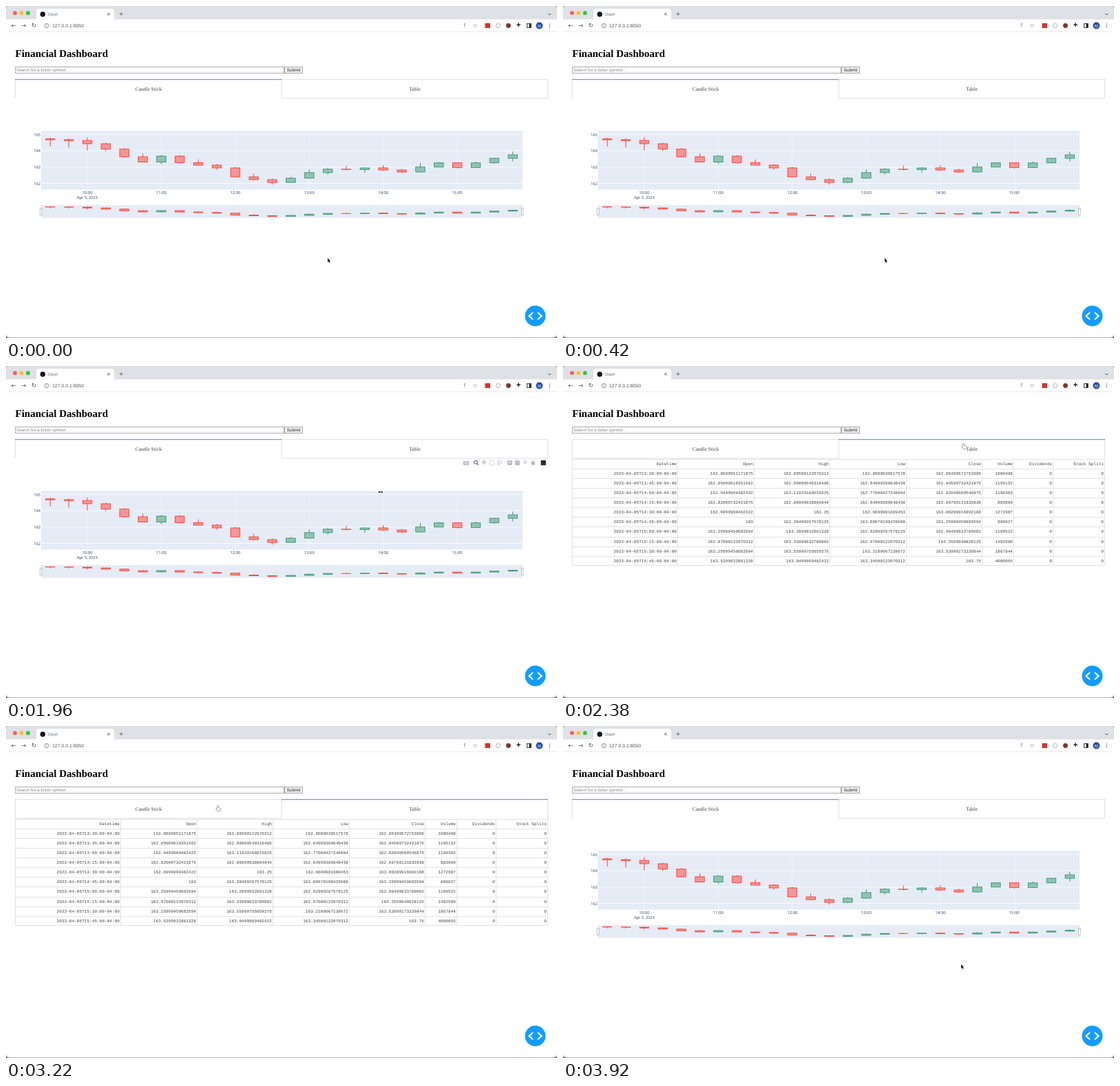
An HTML page with a canvas for the animation above (3.99 s loop, 800x482 px).

```html
<!DOCTYPE html>
<html lang="en">
<head>
<meta charset="utf-8">
<title>Financial Dashboard</title>
<style>
html, body { margin: 0; width: 100%; height: 100%; overflow: hidden; background: #fff; }
canvas { display: block; }
</style>
</head>
<body>
<canvas id="stage" width="800" height="482"></canvas>
<script>
const ctx = document.getElementById('stage').getContext('2d');
ctx.textRendering = 'geometricPrecision';

const LOOP = 3990, STEP = 70, TABLE_FROM = 2310, TABLE_TO = 3360;
const SANS = '"Liberation Sans", Arial, sans-serif';
const SERIF = '"Liberation Serif", Times, serif';
const MONO = '"Liberation Mono", Courier, monospace';
const PLOT = '"Open Sans", Verdana, sans-serif';
const ICON = '"DejaVu Sans", sans-serif';
const UP = '61,153,112', DOWN = '255,65,54', INK = '#2a3f5f';

// Closing prices from 9:30 to 13:15, every 15 minutes
const morning = [164.68, 164.63, 164.43, 164.1, 163.63, 163.31, 163.67, 163.27,
  163.12, 162.95, 162.4, 162.23, 162.06, 162.32, 162.66, 162.87];
// Text of the table from 13:30: high, low, close, volume
const afternoon = `163.095 162.8 162.855 1000498
  162.99 162.65 162.945 1195132
  163.1192 162.77 162.8205 1190303
  162.89 162.65 162.6976 883069
  163.25 162.67 163.0029 1272987
  163.305 163.0007 163.26 886027
  163.29 162.93 162.965 1169522
  163.34 162.97 163.255 1482590
  163.56 163.21 163.5399 1867844
  163.95 163.345 163.75 4000055`.split('\n').map(line => line.trim().split(' ').map(Number));

// Each bar opens at the last close, rounded to cents
const bars = [];
let open = 164.73;
function addBar(high, low, close, volume) {
  bars.push({ open, high, low, close, volume });
  open = Math.round(close * 100) / 100;
}
morning.forEach((close, i) => {
  const above = i % 3 === 2 ? .2 : .07;
  const below = i < 3 ? .42 : i % 3 ? .03 : .13;
  addBar(Math.max(open, close) + above, Math.min(open, close) - below, close);
});
afternoon.forEach(row => addBar(...row));

const columns = { Datetime: 166, Open: 277, High: 387, Low: 498, Close: 608,
  Volume: 654, Dividends: 711, 'Stock Splits': 786 };

// Pointer moves: begin, end, x, y
const home = [467, 366];
const moves = [
  [700, 1120, 451, 371], [1330, 1960, 544, 183], [1960, 2240, 582, 113],
  [2660, 3010, 308, 116], [3290, 3640, 578, 346]
];

function text(s, x, y, size, family, color, align = 'left', weight = '') {
  ctx.font = `${weight} ${size}px ${family}`;
  ctx.fillStyle = color;
  ctx.textAlign = align;
  ctx.fillText(s, x, y);
}
function icon(s, x, y, size, color = '#444') {
  ctx.textBaseline = 'middle';
  text(s, x, y, size, ICON, color, 'center');
  ctx.textBaseline = 'alphabetic';
}
function rect(x, y, w, h, fill) {
  ctx.fillStyle = fill;
  ctx.fillRect(x, y, w, h);
}
function box(x, y, w, h, color, width = 1) {
  ctx.strokeStyle = color;
  ctx.lineWidth = width;
  ctx.strokeRect(x, y, w, h);
}
function disc(x, y, r, fill) {
  ctx.beginPath();
  ctx.arc(x, y, r, 0, 7);
  ctx.fillStyle = fill;
  ctx.fill();
}
function ring(x, y, r, color, width = .8) {
  ctx.beginPath();
  ctx.arc(x, y, r, 0, 7);
  ctx.strokeStyle = color;
  ctx.lineWidth = width;
  ctx.stroke();
}
function round(x, y, w, h, r, fill) {
  ctx.beginPath();
  ctx.roundRect(x, y, w, h, r);
  ctx.fillStyle = fill;
  ctx.fill();
}
function path(d, x, y, stroke, width, fill) {
  const p = new Path2D(d);
  ctx.save();
  ctx.translate(x, y);
  ctx.strokeStyle = stroke;
  ctx.lineWidth = width;
  ctx.stroke(p);
  if (fill) { ctx.fillStyle = fill; ctx.fill(p); }
  ctx.restore();
}

function browser() {
  rect(0, 0, 800, 241, '#d9b45c');
  rect(0, 241, 800, 241, '#77777b');
  round(0, 0, 800, 481.5, 5, '#fff');
  round(0, 0, 800, 19.5, [5, 5, 0, 0], '#dee1e6');
  ['#fe5f57', '#febc2e', '#28c840'].forEach((c, i) => disc(13 + i * 9.5, 10.2, 2.9, c));
  round(44, 4, 113, 16, [4, 4, 0, 0], '#fff');
  disc(53.3, 12, 3.7, '#111');
  text('Dash', 61, 14.2, 6, SANS, '#66696d');
  icon('×', 149, 12, 7);
  icon('+', 167, 12, 8);
  path('M-2-1L0 1L2-1', 789.3, 12, '#444', .9);

  icon('←', 11, 28.5, 8.5);
  icon('→', 25.5, 28.5, 8.5);
  icon('↻', 40.5, 28.5, 8.5);
  ring(59.3, 28.5, 3, '#666');
  icon('i', 59.3, 28.5, 5, '#666');
  text('127.0.0.1:8050', 67, 31, 6.9, SANS, '#555');
  icon('⇪', 666, 28.5, 7.5, '#777');
  icon('☆', 681, 28.5, 8, '#555');
  rect(695.5, 25, 7.5, 7, '#e0302f');
  ring(714.5, 28.5, 3, '#aaa', 1);
  disc(729.5, 28.5, 3.4, '#7c3a2a');
  icon('✚', 744.2, 28.5, 7.5, '#222');
  box(756.5, 25.7, 5.6, 5.6, '#222', .9);
  rect(759.6, 25.5, 2.8, 6, '#222');
  disc(774.4, 28.5, 5, '#2450a4');
  text('M', 774.4, 30.6, 5.8, SANS, '#fff', 'center');
  for (const dy of [-2.4, 0, 2.4]) disc(789.3, 28.5 + dy, .7, '#555');
  rect(0, 37, 800, 1, '#e8eaec');
}

function tab(label, x, w, active) {
  box(x, 106.5, w, 27.5, '#dfdfdf');
  if (active) {
    rect(x + .5, 133, w - 1, 2, '#fff');
    rect(x - .5, 106, w + 1, 1.3, '#6f9cf0');
  }
  text(label, x + w / 2, 123, 7.5, SERIF, '#444', 'center');
}

function page(table) {
  text('Financial Dashboard', 13.5, 74, 15, SERIF, '#000', 'left', 'bold');
  box(13.5, 88.5, 390, 9, '#a4a4a4', .9);
  text('Search for a ticker symbol...', 15, 95.3, 6.2, SANS, '#808080');
  rect(404, 88, 27, 10, '#f0f0f0');
  box(404.5, 88.5, 26, 9, '#a0a0a0', .9);
  text('Submit', 417.5, 95.3, 6.3, SANS, '#222', 'center');
  tab('Candle Stick', 13.5, 387, !table);
  tab('Table', 400.5, 386, table);
  disc(768.5, 450, 15, '#119dff');
  path('M-3.5-5L-9 0L-3.5 5M3.5-5L9 0L3.5 5', 768.5, 450, '#fff', 2.3);
}

const priceY = p => 186.5 + (165 - p) * 23.67;
const sliderY = p => 289 + (priceY(p) - 181) * .2176;
const slotX = i => 64.3 + i * 26.86;

function candles(toY) {
  bars.forEach(({ open, high, low, close }, i) => {
    const x = slotX(i), rgb = close > open ? UP : DOWN;
    const top = toY(Math.max(open, close)), bottom = toY(Math.min(open, close));
    rect(x - 6.7, top, 13.4, bottom - top, `rgba(${rgb},.5)`);
    box(x - 6.7, top, 13.4, bottom - top, `rgb(${rgb})`, .95);
    rect(x - .5, toY(high), 1, top - toY(high), `rgb(${rgb})`);
    rect(x - .5, bottom, 1, toY(low) - bottom, `rgb(${rgb})`);
  });
}

function chart() {
  rect(51, 181.3, 699, 85.2, '#e5ecf6');
  for (let p = 162; p <= 165; p++) {
    rect(51, priceY(p) - .5, 699, 1, '#f8fafd');
    text(p, 50, priceY(p) + 2.1, 5.65, PLOT, INK, 'right');
  }
  for (let h = 10; h <= 15; h++) {
    const x = slotX((h - 9.5) * 4);
    rect(x - .4, 181.3, .8, 85.2, '#f3f6fb');
    text(h + ':00', x, 272.8, 5.9, PLOT, INK, 'center');
  }
  text('Apr 5, 2023', slotX(2), 280, 5.7, PLOT, INK, 'center');
  candles(priceY);
  rect(51, 289, 699, 18.5, '#e5ecf6');
  candles(sliderY);
  for (const x of [49.7, 748.7]) {
    rect(x, 293.5, 2.4, 10, '#fff');
    box(x, 293.5, 2.4, 10, '#999', .6);
  }
}

function modebar() {
  const y = 140.5, grey = '#b4bac4';
  round(664, y - 2.5, 8, 6, 1, grey);
  ring(668, y + .4, 1.6, '#fff');
  ring(682, y - .8, 2.4, '#717988', 1.2);
  path('M0 0L2.4 2.4', 683.8, y + 1, '#717988', 1.3);
  icon('✥', 694, y, 9, grey);
  ctx.setLineDash([1.5, 1]);
  box(702, y - 3, 6.2, 6.2, grey, .9);
  ctx.setLineDash([]);
  ring(716.6, y - .6, 2.6, grey, .9);
  path('M0 0L-1 2', 715, y + 1.5, grey, .9);
  for (const [sign, x] of [['+', 731.3], ['−', 742.5]]) {
    rect(x - 3.4, y - 3.4, 6.8, 6.8, grey);
    icon(sign, x, y, 6.5, '#fff');
  }
  icon('✕', 753.8, y, 9, grey);
  path('M-3 0L0-2.7L3 0H2V2.7H-2V0Z', 765.2, y, grey, .8, grey);
  rect(776.6, y - 3.6, 7.2, 7.2, '#2a2730');
}

function grid() {
  const rowH = 14.07, top = 135, rights = Object.values(columns);
  const rows = bars.slice(morning.length).map(({ open, high, low, close, volume }, i) => {
    const minutes = 13.5 * 60 + i * 15;
    const clock = `${Math.floor(minutes / 60)}:${String(minutes % 60).padStart(2, '0')}`;
    // Prices print as single precision floats
    return [`2023-04-05T${clock}:00-04:00`, ...[open, high, low, close].map(Math.fround), volume, 0, 0];
  });
  [Object.keys(columns), ...rows].forEach((row, r) => {
    const y = top + r * rowH;
    rect(13, Math.round(y), 774, 1, '#e2e2e2');
    row.forEach((cell, c) => text(cell, rights[c] - 1, y + 9, 6.1, MONO, '#444', 'right'));
  });
  rect(13, 289, 774, 1, '#e2e2e2');
  for (const x of [13, ...rights]) rect(x, top, 1, 155, '#e2e2e2');
}

function pointerAt(t) {
  let [x, y] = home;
  for (const [begin, end, toX, toY] of moves) {
    const u = Math.min(1, Math.max(0, (t - begin) / (end - begin)));
    const ease = u * u * (3 - 2 * u);
    x += (toX - x) * ease;
    y += (toY - y) * ease;
  }
  return [x, y];
}

function cursor(x, y) {
  ctx.lineJoin = 'round';
  if (y > 106 && y < 135) {
    path('M-1.2 0H.2V2.6L3.6 3.6V5.6L2.8 7.5H-.9L-3 4.4L-1.2 4.2Z', x, y, '#444', .9, '#fff');
  } else if (y > 178 && y < 267) {
    path('M-3.4 0L-1.5-1.8V-.6H1.5V-1.8L3.4 0L1.5 1.8V.6H-1.5V1.8Z', x, y, '#fff', .7, '#222');
  } else {
    path('M0 0V6L1.4 4.8L2.4 7L3.5 6.5L2.5 4.4H4.2Z', x, y, '#fff', .8, '#111');
  }
  ctx.lineJoin = 'miter';
}

function draw(now) {
  const t = Math.floor(now % LOOP / STEP) * STEP;
  const table = t >= TABLE_FROM && t < TABLE_TO;
  const [x, y] = pointerAt(t);
  browser();
  page(table);
  if (table) grid();
  else {
    chart();
    if (y > 135 && y < 345) modebar();
  }
  cursor(x, y);
}

let start;
function tick(now) {
  start ??= now;
  draw(now - start);
  requestAnimationFrame(tick);
}
requestAnimationFrame(tick);
</script>
</body>
</html>
```
